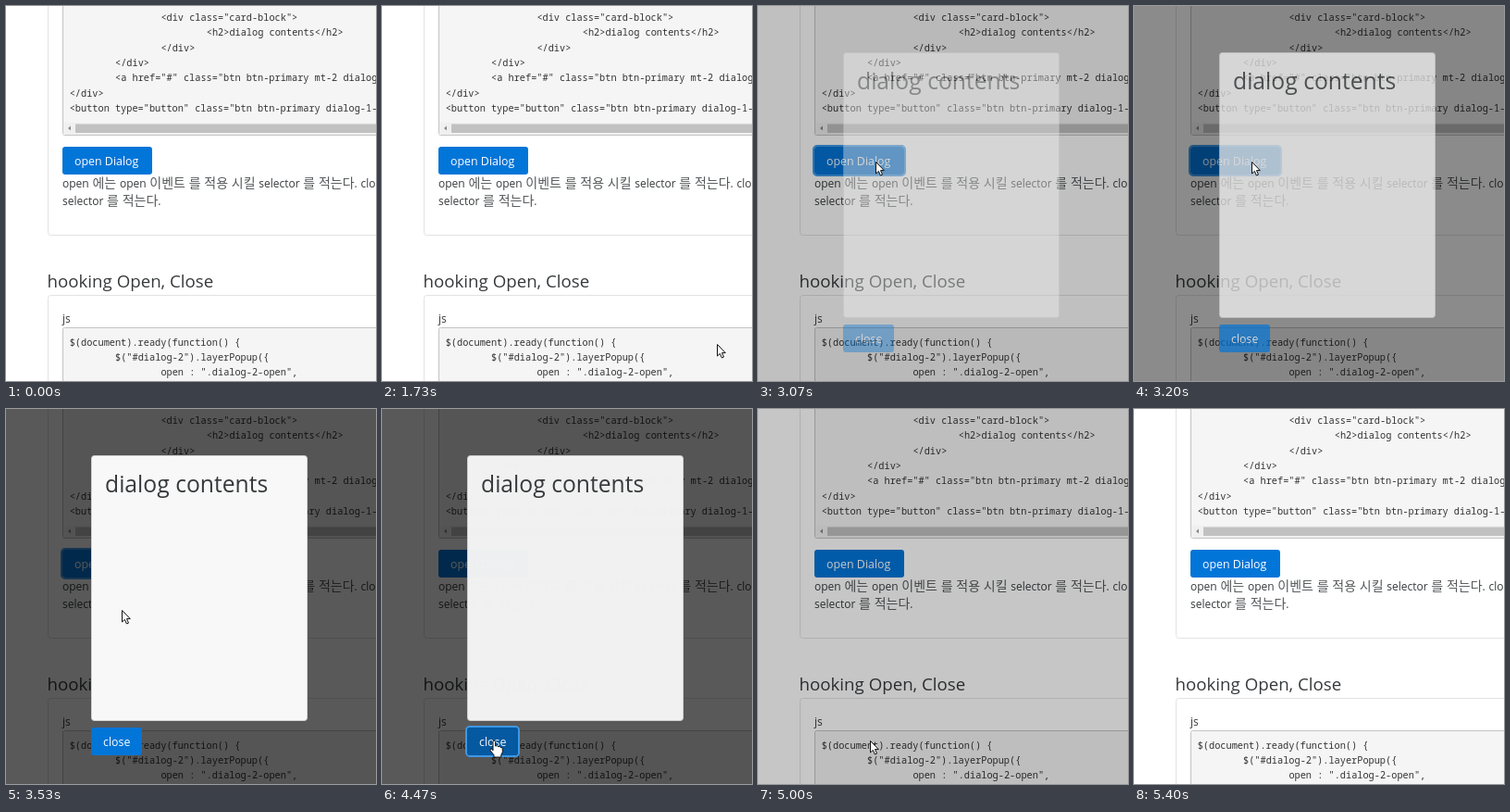
Write an HTML page that moves like this. It is 400 px wide and 405 px high and loops after 5.47 s.

```html
<!DOCTYPE html>
<html lang="ko">
<head>
<meta charset="utf-8">
<style>
  html, body { margin: 0; width: 100%; height: 100%; overflow: hidden; background: #fff; }
  svg { display: block; width: 400px; height: 405px; }
  text { font: 12px "Open Sans", "Noto Sans", sans-serif; fill: #373a3c; white-space: pre; }
  .ko { font: 300 14px "Noto Sans CJK KR", "Noto Sans CJK", sans-serif; fill: #55585a; }
  .para { word-spacing: .6px; }
  .code text { font: 10.28px "Noto Sans Mono", "DejaVu Sans Mono", monospace; fill: #333; }
  .label { font-size: 12.4px; font-weight: 500; fill: #fff; }
  .card { fill: #fff; stroke: #e2e2e2; }
  .pre { fill: #f5f5f5; stroke: #c4c4c4; }
  .ring { fill: none; stroke: #3f9bea; stroke-width: 2px; }
  .cursor path { fill: #fff; stroke: #111; stroke-linejoin: round; }
</style>
</head>
<body>
<svg viewBox="0 0 400 405">
  <rect class="card" x="45.5" y="-20" width="400" height="267.5" rx="3"/>
  <rect class="card" x="45.5" y="312.5" width="400" height="200" rx="3"/>
  <rect class="pre" x="61.5" y="-20" width="400" height="159.5" rx="2"/>
  <rect class="pre" x="61.5" y="347.5" width="400" height="100" rx="2"/>
  <rect x="62" y="126" width="338" height="13" fill="#f0f0f0"/>
  <rect x="75" y="127.5" width="325" height="9.5" fill="#c1c1c1"/>
  <path d="M70 129.5v5l-3-2.5z" fill="#888"/>
  <g class="code" id="code"></g>

  <rect class="ring" id="openRing" x="60" y="151" width="99" height="32" rx="4"/>
  <rect id="open" x="61" y="152" width="97" height="30" rx="3"/>
  <text class="label" x="74" y="171.5">open Dialog</text>
  <text class="para" x="61" y="196">open <tspan class="ko">에는</tspan> open <tspan class="ko">이벤트</tspan> <tspan class="ko">를</tspan> <tspan class="ko">적용</tspan> <tspan class="ko">시킬</tspan> selector <tspan class="ko">를</tspan> <tspan class="ko">적는다</tspan>. close</text>
  <text class="para" x="61" y="214.5">selector <tspan class="ko">를</tspan> <tspan class="ko">적는다</tspan>.</text>
  <text x="44.5" y="303.5" style="font-size:18.7px">hooking Open, Close</text>
  <text x="61" y="342">js</text>

  <rect id="shade" width="400" height="405"/>
  <g id="dialog">
    <rect x="92.5" y="50.5" width="233" height="286" rx="3" fill="#f8f8f8" stroke="#d4d4d4"/>
    <text x="107" y="89.5" style="font-size:24.7px">dialog contents</text>
    <rect class="ring" id="closeRing" x="91" y="343" width="57" height="32" rx="4"/>
    <rect id="close" x="92" y="344" width="55" height="30" rx="3"/>
    <text class="label" x="105" y="363.5">close</text>
  </g>

  <g class="cursor" id="cursor">
    <path id="arrow" d="M.5 .5V13L3.4 10.4 5.4 15 7.5 14.1 5.5 9.6H9.3Z"/>
    <path id="hand" d="M-1 9V1.5Q-1 .2 .3 .2T1.6 1.5V6Q4 5 4.4 6.7 6.5 5.8 7 7.4 9.3 6.8 9.3 9V12.5L7.8 15.5V18H0V15.7L-4 10.8Q-4.3 9 -2.5 9L-1 10.8Z"/>
  </g>
</svg>
<script>
const $ = id => document.getElementById(id);
const LOOP = 5470, STEP = 200 / 3;
const BLUE = "#0275d8", DARK = "#025aa5";

function addCode(baseline, lines) {
  lines.forEach(([tabs, str], i) => {
    const el = document.createElementNS("http://www.w3.org/2000/svg", "text");
    el.setAttribute("x", 68.7 + tabs * 49.35);
    el.setAttribute("y", baseline + i * 16.33);
    el.textContent = str;
    $("code").append(el);
  });
}
addCode(16, [
  [2, '<div class="card-block">'],
  [3, "<h2>dialog contents</h2>"],
  [2, "</div>"],
  [1, "</div>"],
  [1, '<a href="#" class="btn btn-primary mt-2 dialog-1-close">'],
  [0, "</div>"],
  [0, '<button type="button" class="btn btn-primary dialog-1-open">'],
]);
addCode(366.5, [
  [0, "$(document).ready(function() {"],
  [1, '$("#dialog-2").layerPopup({'],
  [2, 'open : ".dialog-2-open",'],
]);

// pointer stops: time, x, y
const stops = [
  [1730, 362, 365], [2070, 15, 172], [2270, 142, 155], [2400, 142, 155],
  [2530, 127, 168], [3330, 127, 168], [3930, 121, 358],
  [5200, 121, 358], [5400, 118, 410],
];

const swing = p => 0.5 - Math.cos(Math.PI * Math.min(1, Math.max(0, p))) / 2;
const ramp = (t, start, length) => swing((t - start) / length);

function pointer(t) {
  const i = stops.findIndex(s => s[0] > t);
  if (i < 1) return stops[i ? stops.length - 1 : 0].slice(1);
  const [a, b] = [stops[i - 1], stops[i]];
  const p = ramp(t, a[0], b[0] - a[0]);
  return [a[1] + (b[1] - a[1]) * p, a[2] + (b[2] - a[2]) * p];
}

const inside = (x, y, l, t, r, b) => x >= l && x <= r && y >= t && y <= b;
const show = (id, on) => $(id).style.display = on ? "" : "none";

function draw(now) {
  const t = Math.floor((now % LOOP + 5) / STEP) * STEP;
  const [x, y] = pointer(t);
  const popup = t > 2795 && t < 4795;
  const onOpen = t < 2795 && inside(x, y, 61, 152, 158, 182);
  const onClose = popup && inside(x, y, 92, 344, 147, 374);
  const pressed = t > 4265;
  const fadeIn = ramp(t, 2795, 640);

  $("open").setAttribute("fill", onOpen && t > 2320 ? DARK : BLUE);
  $("close").setAttribute("fill", onClose ? DARK : BLUE);
  $("shade").setAttribute("opacity", 0.65 * fadeIn * (1 - ramp(t, 4470, 880)));
  $("dialog").setAttribute("opacity", fadeIn * (1 - ramp(t, 4420, 375)));
  show("openRing", popup && !pressed);
  show("closeRing", pressed);

  const hand = onOpen || onClose;
  $("cursor").setAttribute("transform", `translate(${Math.round(x)} ${Math.round(y)})`);
  show("cursor", t > 1725 && t < 5395);
  show("arrow", !hand);
  show("hand", hand);
}

const began = performance.now();
function tick() {
  draw(performance.now() - began);
  requestAnimationFrame(tick);
}
tick();
</script>
</body>
</html>
```
